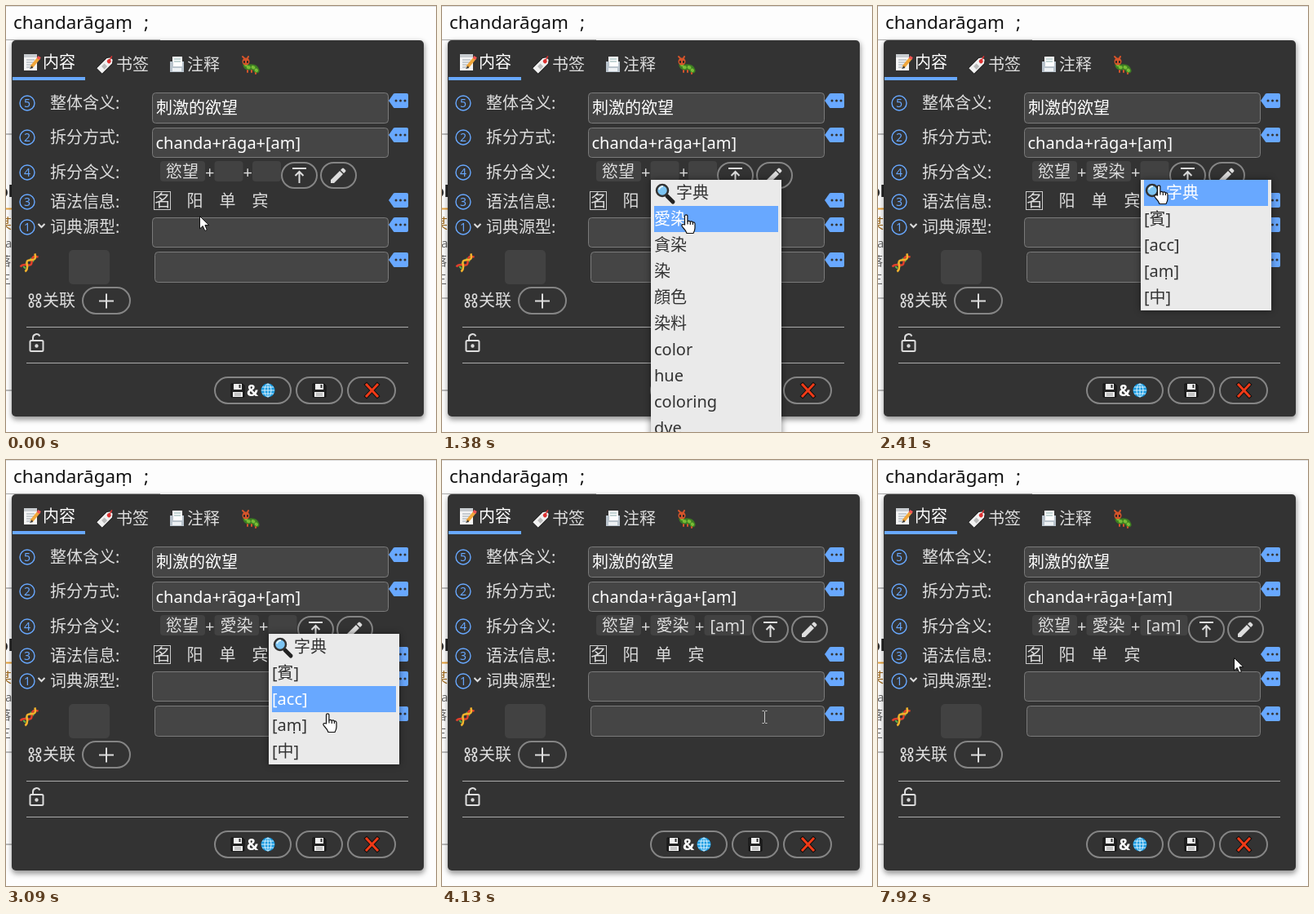
An HTML page for the animation above (8 s loop, 527 by 522 pixels).

```html
<!DOCTYPE html>
<html lang="zh-CN">
<head>
<meta charset="utf-8">
<style>
html, body { margin: 0; width: 100%; height: 100%; overflow: hidden; background: #fdfdfd; }
svg { display: block; }
text { font: 20px "Noto Sans", "Noto Sans CJK SC", "Noto Sans CJK", sans-serif; fill: #ddd; white-space: pre; }
.bright { fill: #fff; font-weight: 500; }
.field { fill: #454545; stroke: #7a7a7a; }
.chip { fill: #424242; }
.pill { fill: none; stroke: #858585; stroke-width: 2; }
.line { fill: none; stroke: #ddd; stroke-width: 2; }
.menu text { fill: #333; }
.menu text.on { fill: #fff; }
.menu { filter: drop-shadow(0 0 4px #0007); }
</style>
</head>
<body>
<svg width="527" height="522" viewBox="0 0 527 522">
  <defs>
    <g id="floppy">
      <path d="M-8-8H6L8-6V8H-8Z" fill="#222" stroke="#111"/>
      <path d="M-5-8H5V-1H-5ZM-6 2H6V8H-6Z" fill="#eee"/>
      <path d="M1.500-7h2v4h-2Z" fill="#333"/>
      <path d="M-4 4H4M-4 6H4" stroke="#999"/>
    </g>
    <g id="glass">
      <path d="M3 4L10 11" stroke="#222" stroke-width="5" stroke-linecap="round"/>
      <circle cx="-3" cy="-3" r="7" fill="#7cc4f2" stroke="#333" stroke-width="2.500"/>
      <path d="M-7-4q1-4 5-4" fill="none" stroke="#dff3ff" stroke-width="2"/>
    </g>
    <path id="arrow" d="M.5.5V16L4.200 12.600 6.800 18.500 9.400 17.400 6.900 11.600H11.800Z" fill="#fff" stroke="#111"/>
    <path id="hand" d="M-2.500 12V1.500a1.700 1.700 0 0 1 3.400 0V8q1.800-1.400 3.300.3 2-1 3.100.7 2.600-.5 2.700 2V16q0 3-2 6.500H0q-1-3-3-5l-3-3.700q-.5-2.300 1.500-2.300Z M1 8v3.500M4.300 8.500V12M7.400 9v3" fill="#fff" stroke="#111" stroke-width="1.200"/>
    <path id="beam" d="M-3-7.500H-1L0-6.500 1-7.500H3M0-6.500V6.500M-3 7.500H-1L0 6.500 1 7.500H3" fill="none" stroke="#ccc"/>
    <filter id="soft" x="-10%" y="-10%" width="120%" height="120%"><feGaussianBlur stdDeviation="3"/></filter>
  </defs>

  <!-- page behind the panel -->
  <path d="M0 .5H527" stroke="#ddd"/>
  <path d="M0 41.500H189" stroke="#aaa"/>
  <path d="M0 157H7M0 358H7M0 471H7" stroke="#bbb" stroke-width="2"/>
  <text x="9" y="28" style="font-size:22.400px;fill:#111">chandarāgaṃ</text>
  <text x="169" y="28" style="font-size:22.400px;fill:#111">;</text>
  <g>
    <text x="-9" y="234" style="font-size:19px;font-weight:700;fill:#222">ol</text>
    <path d="M0 248.500H7" stroke="#e8a33a" stroke-width="2"/>
    <text x="-10" y="273" style="font-size:17px;fill:#a06a1c">某</text>
    <text x="-1" y="296" style="font-size:15px;fill:#666">a</text>
    <text x="-9" y="318" style="font-size:15px;fill:#666">落</text>
    <text x="-9" y="340" style="font-size:15px;fill:#666">三</text>
  </g>
  <rect x="7" y="44" width="506" height="463" rx="6" fill="#0006" filter="url(#soft)"/>
  <rect x="7" y="42" width="505" height="461" rx="5" fill="#333"/>

  <!-- tabs -->
  <g transform="translate(31 69)">
    <path d="M-9-9H7V10H-9Z" fill="#f4f4f4"/>
    <path d="M-9-10H7V-6H-9Z" fill="#c8ccd0"/>
    <path d="M-6-3H4M-6 0H4M-6 3H1M-6 6H0" stroke="#9aa4ad"/>
    <path d="M9-5L0 6" stroke="#f0a63a" stroke-width="4"/>
    <path d="M10-7L8.500-4" stroke="#e55" stroke-width="4"/>
    <path d="M1 4L-2 8 2 7Z" fill="#333"/>
  </g>
  <text class="bright" x="45" y="76">内容</text>
  <path d="M8 89H97" stroke="#68a8ff" stroke-width="4"/>
  <g transform="translate(122 72) rotate(45)">
    <path d="M-5-7L-2-11H2L5-7V11H-5Z" fill="#f1f1f1" stroke="#222"/>
    <circle cy="-6" r="2.500" fill="#d33"/>
    <path d="M0-6L-2-13" stroke="#d33" stroke-width="1.500"/>
    <path d="M-2 0H3V5H-2Z" fill="#bbb"/>
  </g>
  <text x="135" y="79">书签</text>
  <g transform="translate(210 72)">
    <path d="M-6-10H6V3H-6Z" fill="#fff"/>
    <path d="M-9-4H-5V2H6V-4H8V9H-9Z" fill="#b9c3cc"/>
    <path d="M-4-7H4M-4-4H4" stroke="#8aa"/>
    <path d="M-6 4H5V8H-6Z" fill="#edf1f4"/>
  </g>
  <text x="222" y="79">注释</text>
  <g fill="none" stroke-linecap="round" transform="translate(299 72)">
    <path d="M-5-3Q-6 4 0 3T8 7" stroke="#3c7d22" stroke-width="7"/>
    <path d="M-5-1Q-5 4 0 3T8 7" stroke="#79bd36" stroke-width="4" stroke-dasharray="1 4.500"/>
    <circle cx="-5" cy="-4" r="4.500" fill="#d4542b"/>
    <path d="M-7-8L-9-10M-3-8L-2-10" stroke="#d4542b" stroke-width="2"/>
    <path d="M-7-4v1M-3-4v1" stroke="#222" stroke-width="2"/>
    <path d="M-3 7v2M2 7v2M7 10v1" stroke="#d4542b" stroke-width="2"/>
  </g>

  <g id="rows"></g>
  <rect class="field" x="179.500" y="106.500" width="289" height="37" rx="4"/>
  <rect class="field" x="179.500" y="149.500" width="289" height="36" rx="4"/>
  <rect class="field" x="179.500" y="259.500" width="289" height="36" rx="4"/>
  <rect class="field" x="182.500" y="301.500" width="286" height="37" rx="4"/>
  <text class="bright" x="184" y="132">刺激的欲望</text>
  <text class="bright" x="183.500" y="175">chanda+rāga+[aṃ]</text>
  <rect x="181.500" y="227.500" width="20" height="22" fill="none" stroke="#ccc"/>
  <text x="182" y="246">名</text><text x="221.500" y="246">阳</text><text x="261.500" y="246">单</text><text x="301.500" y="246">宾</text>
  <path class="line" d="M39.500 267L43.500 271 47.500 267"/>

  <g transform="translate(29 314) rotate(-45)" fill="none" stroke-width="2.500">
    <path d="M-9-2V2M-4-3V3M4-3V3M9-2V2" stroke="#5ab04a" stroke-width="2"/>
    <path d="M-12-4C-5-6-4 5 0 3S7-6 12 3" stroke="#e0402c"/>
    <path d="M-12 4C-5 6-4-5 0-3S7 6 12-3" stroke="#f4b32c"/>
  </g>
  <rect class="chip" x="77" y="299" width="50" height="42" rx="5"/>

  <g class="line" style="stroke-width:1.600">
    <ellipse cx="31" cy="356" rx="2.500" ry="3"/><ellipse cx="40" cy="356" rx="2.500" ry="3"/>
    <ellipse cx="31" cy="366" rx="2.500" ry="3"/><ellipse cx="40" cy="366" rx="2.500" ry="3"/>
    <path d="M31 358V364M40 358V364M33 361H38"/>
  </g>
  <text x="45" y="368">关联</text>
  <rect class="pill" x="94" y="345" width="58" height="32" rx="16"/>
  <path class="line" d="M114 361.500H132M123 352.500V370.500"/>
  <path d="M25 393.500H493M25 437.500H493" stroke="#aaa"/>
  <g class="line">
    <rect x="29.500" y="410" width="16" height="13" rx="1.500"/>
    <path d="M33 410V406.500a4.500 4.500 0 0 1 8.500-2"/>
    <circle cx="37.500" cy="416.500" r="1.200"/>
  </g>

  <rect class="pill" x="256" y="455" width="93" height="32" rx="16"/>
  <rect class="pill" x="356" y="455" width="56" height="32" rx="16"/>
  <rect class="pill" x="419" y="455" width="58" height="32" rx="16"/>
  <use href="#floppy" x="284" y="471"/>
  <use href="#floppy" x="384" y="471"/>
  <text x="295" y="478" style="font-weight:700;font-size:19px;fill:#fff">&amp;</text>
  <g transform="translate(321 471)" fill="none" stroke="#d5f1ff">
    <circle r="8.500" fill="#1d9be0" stroke="none"/>
    <ellipse rx="4" ry="8"/><path d="M0-8V8M-8 0H8M-7-4H7M-7 4H7"/>
  </g>
  <g stroke-linecap="square">
    <path d="M442 464L455 478M455 464L442 478" stroke="#111" stroke-width="5"/>
    <path d="M442 464L455 478M455 464L442 478" stroke="#f03a17" stroke-width="3"/>
  </g>

  <g id="live"></g>
</svg>
<script>
const $ = id => document.getElementById(id);
const blue = '#68a8ff';

const labels = [['⑤', 119, '整体含义'], ['②', 161, '拆分方式'], ['④', 204, '拆分含义'],
  ['③', 240, '语法信息'], ['①', 271, '词典源型']];
const digits = '①②③④⑤';
$('rows').innerHTML = labels.map(([mark, y, name]) => `
  <circle cx="26" cy="${y}" r="9" fill="none" stroke="${blue}" stroke-width="1.400"/>
  <text x="26" y="${y + 5}" text-anchor="middle" style="font-size:14px;fill:${blue}">${digits.indexOf(mark) + 1}</text>
  <text x="54" y="${y + 7}">${name}:</text>`).join('') +
  [116, 158, 238, 268, 311].map(y => `
  <path d="M469 ${y}L475 ${y - 8.5}Q475.500 ${y - 9} 477 ${y - 9}H491Q493 ${y - 9} 493 ${y - 7}V${y + 7}Q493 ${y + 9} 491 ${y + 9}H477Q475.500 ${y + 9} 475 ${y + 8.5}Z" fill="${blue}"/>
  <path d="M478 ${y}h0m5.500 0h0m5.500 0h0" stroke="#333" stroke-width="3" stroke-linecap="round"/>`).join('');

const roots = ['字典', '愛染', '貪染', '染', '顔色', '染料', 'color', 'hue', 'coloring', 'dye'];
const endings = ['字典', '[賓]', '[acc]', '[aṃ]', '[中]'];

// start ms, pointer, x, y, open menu (1 or 2), hovered row
const steps = [
  [0, 'arrow', 237, 257],
  [350, 'hand', 275, 208, 1],
  [690, 'hand', 277, 201, 1],
  [1030, 'hand', 290, 236, 1, 0],
  [1380, 'hand', 300, 256, 1, 1],
  [1720, 'arrow', 302, 252],
  [2070, 'hand', 334, 203, 2],
  [2410, 'hand', 345, 220, 2, 0],
  [2750, 'hand', 389, 286, 2, 2],
  [3090, 'hand', 395, 311, 2, 2],
  [3440, 'hand', 391, 305, 2, 3],
  [3790, 'hand', 395, 305, 2, 3],
  [4130, 'beam', 395.5, 315],
  [5850, 'beam', 393.5, 310],
  [6210, 'beam', 389.5, 291],
  [6550, 'arrow', 361, 248],
  [6880, 'arrow', 359, 247],
  [7230, 'arrow', 391, 240],
  [7560, 'arrow', 432, 234],
  [7920, 'arrow', 436, 242]];

function parts(words) {
  let x = 189, out = '';
  words.forEach(([word, width], i) => {
    if (i) {
      out += `<text x="${x}" y="211">+</text>`;
      x += 11.5;
    }
    out += `<rect class="chip" x="${x}" y="190" width="${width}" height="25" rx="4"/>
      <text x="${x + 7}" y="210">${word}</text>`;
    x += width;
  });
  x = Math.round(x);
  return out + `
    <rect class="pill" x="${x + 1}" y="192" width="43" height="31" rx="15.500"/>
    <rect class="pill" x="${x + 49}" y="192" width="43" height="31" rx="15.500"/>
    <path class="line" d="M${x + 14} 199H${x + 31}M${x + 22.5} 217V203M${x + 17.5} 208l5-5 5 5"/>
    <path d="M${x + 61} 217v-4l11-11 4 4-11 11ZM${x + 73} 201l2-2q1-1 2 0l2 2q1 1 0 2l-2 2Z" fill="#ddd"/>`;
}

function menu(x, items, hover) {
  return `<g class="menu"><rect x="${x}" y="213" width="160" height="${items.length * 32}" fill="#eaeaea"/>` +
    items.map((item, i) => {
      const y = 213 + i * 32, on = i === hover;
      return (on ? `<rect x="${x + 4}" y="${y}" width="152" height="32" fill="${blue}"/>` : '') +
        (i ? '' : `<use href="#glass" x="${x + 17}" y="${y + 16}"/>`) +
        `<text class="${on ? 'on' : ''}" x="${x + (i ? 4 : 31)}" y="${y + 23}">${item}</text>`;
    }).join('') + '</g>';
}

let shown;
function frame(now) {
  const t = now % 8000;
  const step = steps.findLast(s => s[0] <= t);
  if (step !== shown) {
    shown = step;
    const [start, pointer, x, y, open, hover] = step;
    const second = start >= 1720 ? ['愛染', 54.5] : ['', 35];
    const third = start >= 4130 ? ['[aṃ]', 58] : ['', 35];
    $('live').innerHTML = parts([['慾望', 55], second, third]) +
      (open ? menu(open === 1 ? 256 : 322, open === 1 ? roots : endings, hover) : '') +
      `<use href="#${pointer}" x="${x}" y="${y}"/>`;
  }
  requestAnimationFrame(frame);
}
frame(0);
</script>
</body>
</html>
```
